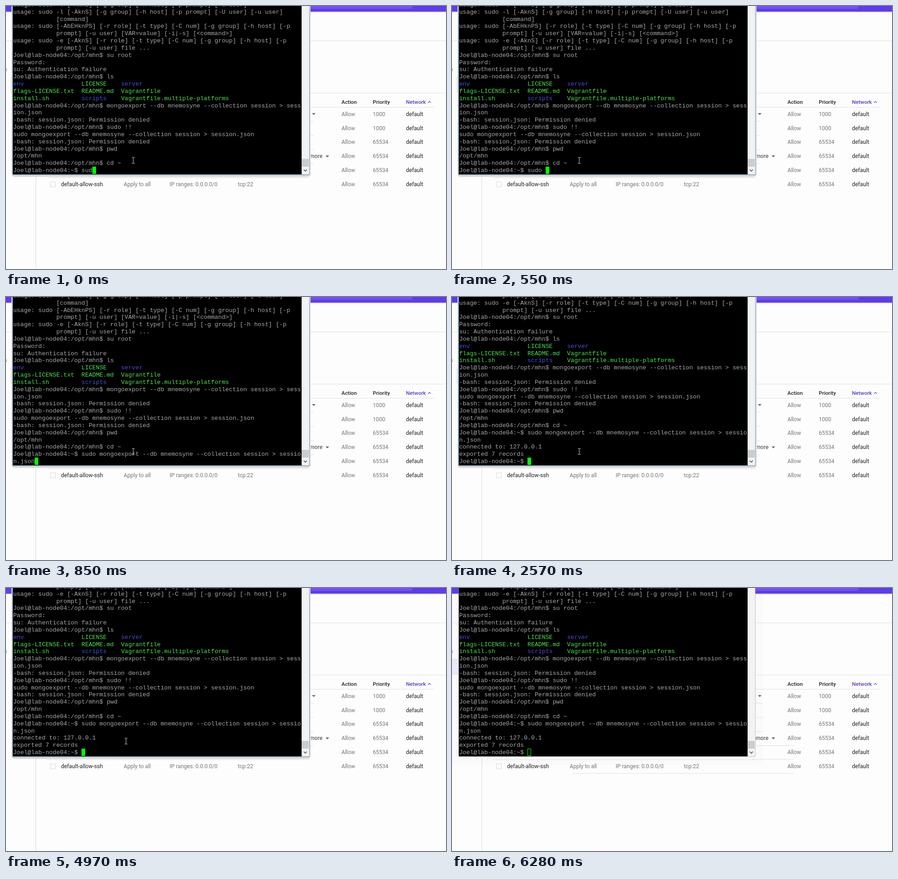
An HTML page for the animation above (6.38 s loop, 968 by 578 pixels).

```html
<!DOCTYPE html>
<html lang="en">
<head>
<meta charset="utf-8">
<title>Terminal export</title>
<style>
  html, body { margin: 0; width: 100%; height: 100%; overflow: hidden; background: #fdfdfd; }
  svg { display: block; width: 968px; height: 578px; }
  text { white-space: pre; }
  .page text { font: 12.15px Roboto, sans-serif; fill: #757575; }
  .page .dark { fill: #212121; }
  .page .head { font-size: 11.6px; font-weight: 500; fill: #212121; }
  .page .sorted { fill: #5a34d6; }
  .page .more { font-weight: 500; fill: #616161; }
  .rule { stroke: #e0e0e0; fill: none; }
  #terminal text { font: 13.2px "Liberation Mono", monospace; fill: #a8a8a8; }
  #terminal .dir { fill: #4c4ce0; }
  #terminal .exe { fill: #4ce64c; }
</style>
</head>
<body>
<svg viewBox="0 0 968 578">
  <g class="page">
    <rect width="968" height="578" fill="#fdfdfd"/>
    <rect id="tint" width="684" height="388" fill="#fafafa"/>
    <rect width="968" height="12" fill="#5f3bee"/>
    <path d="M640 0H894V4q0 2-2 2H640z" fill="#7351f6"/>
    <path d="M0 12.5H968" stroke="#a99ae8"/>
    <path d="M0 13.5H968" stroke="#dedee4"/>
    <path class="rule" d="M0 76.5H968M640 191.5H968M640 222.5H942"/>
    <path d="M65.5 360V578" stroke="#d9d9d9"/>
    <path id="rowRules" class="rule"/>
    <path id="lateRules" class="rule" d="M660 346.5H752M660 376.5H752M265 407.5H752"/>
    <rect id="selected" y="155" width="15" height="36" fill="#e9e9f8"/>
    <text x="-4" y="143">s</text>
    <path d="M673 235.5h8l-4 4zM703 328.5h8l-4 4z" fill="#616161"/>
    <text class="more" x="668" y="334">more</text>
    <text class="head" x="738" y="215">Action</text>
    <text class="head" x="807" y="215">Priority</text>
    <text class="head sorted" x="880" y="215">Network</text>
    <path d="M928.5 212.5l3-3 3 3" fill="none" stroke="#5a34d6" stroke-width="1.2"/>
    <g id="rules"></g>
    <rect x="97.5" y="386.5" width="11" height="11" fill="none" stroke="#d8d8d8"/>
    <text class="dark" x="121" y="396">default-allow-ssh</text>
    <text x="259" y="396">Apply to all</text>
    <text x="360" y="396">IP ranges: 0.0.0.0/0</text>
    <text x="510" y="396">tcp:22</text>
  </g>

  <g id="shadow">
    <rect x="12.5" y="-20" width="657" height="395" rx="6" fill="#e0e0e0" stroke="#cfcfcf"/>
    <rect x="14" y="-20" width="654" height="393" rx="3" fill="#cacaca"/>
  </g>
  <rect id="frame" x="14.5" y="-5" width="653" height="375.5"/>
  <rect x="15" width="635.5" height="370"/>
  <rect x="650.5" width="16.5" height="370" fill="#f2f2f2"/>
  <rect x="651" y="336" width="15" height="17" fill="#cdcdcd"/>
  <path d="M655 359.5l3.5 3.5 3.5-3.5" fill="none" stroke="#505050" stroke-width="1.6"/>

  <g id="terminal"></g>
  <rect id="caret"/>
  <path id="ibeam" d="M-3 -6.5h2.5l.5.5.5-.5h2.5M0-6V6M-3 6.5h2.5L0 6l.5.5h2.5" fill="none" stroke="#ddd"/>
  <path id="arrow" d="M.5.5V13l2.8-2.6 2 4.1 1.7-.8-1.9-4H9.5z" fill="#fff" stroke="#222" stroke-width=".9"/>
</svg>
<script>
const LOOP = 6380, ROWS = 24, ROW_H = 15.83, COL_W = 7.922, LEFT = 15.7, LAST_TOP = 353;
const PATCH_AT = 5270, BLUR_AT = 6280;
const $ = id => document.getElementById(id);
const dir = s => `<tspan class="dir">${s}</tspan>`;
const exe = s => `<tspan class="exe">${s}</tspan>`;

const host = "Joel@lab-node04:";
const opt = host + "/opt/mhn$ ";
const home = host + "~$ ";
const indent = " ".repeat(12);
const dump = "mongoexport --db mnemosyne --collection session > ";
const denied = "-bash: session.json: Permission denied";

const history = [
  "usage: sudo -v [-AknS] [-g group] [-h host] [-p prompt] [-u user]",
  "usage: sudo -l [-AknS] [-g group] [-h host] [-p prompt] [-U user] [-u user]",
  indent + "[command]",
  "usage: sudo [-AbEHknPS] [-r role] [-t type] [-C num] [-g group] [-h host] [-p",
  indent + "prompt] [-u user] [VAR=value] [-i|-s] [&lt;command&gt;]",
  "usage: sudo -e [-AknS] [-r role] [-t type] [-C num] [-g group] [-h host] [-p",
  indent + "prompt] [-u user] file ...",
  opt + "su root",
  "Password:",
  "su: Authentication failure",
  opt + "ls",
  dir("env") + " ".repeat(16) + exe("LICENSE") + "    " + dir("server"),
  exe("flags-LICENSE.txt  README.md  Vagrantfile"),
  exe("install.sh") + " ".repeat(9) + dir("scripts") + "    " + exe("Vagrantfile.multiple-platforms"),
  opt + dump + "sess",
  "ion.json",
  denied,
  opt + "sudo !!",
  "sudo " + dump + "session.json",
  denied,
  opt + "pwd",
  "/opt/mhn",
  opt + "cd ~"
];

const command = [home + "sudo " + dump + "sessio", "n.json"];
const screens = [
  [0, [home + "sud"]],
  [150, [home + "sudo"]],
  [550, [home + "sudo "]],
  [850, command],
  [1570, [...command, ""]],
  [2570, [...command, "connected to: 127.0.0.1", "exported 7 records", home]]
];

// Start time, shape, x, y
const pointers = [
  [0, "ibeam", 280, 339.5],
  [4970, "ibeam", 264, 336.5],
  [5120, "ibeam", 268, 336.5],
  [5270, "arrow", 743, 497],
  [5420, "arrow", 896, 491],
  [5580, "arrow", 940, 497],
  [5730, "arrow", 944, 524],
  [5880, "arrow", 948, 563],
  [5980, "none", 0, 0]
];

const at = (steps, t) => steps.findLast(step => step[0] <= t);
const show = (id, on) => $(id).setAttribute("visibility", on ? "visible" : "hidden");
const set = (id, attrs) => {
  for (const name in attrs) $(id).setAttribute(name, attrs[name]);
};

$("rules").innerHTML = [1000, 1000, 65534, 65534, 65534, 65534].map((priority, i) => {
  const y = Math.round(241.7 + i * 30.85);
  return `<text x="738" y="${y}">Allow</text><text x="807" y="${y}">${priority}</text>` +
    `<text class="dark" x="880" y="${y}">default</text>`;
}).join("");

let shownScreen;
function drawTerminal(screen) {
  if (screen === shownScreen) return;
  shownScreen = screen;
  const lines = [...history, ...screen[1]].slice(-ROWS);
  $("terminal").innerHTML = lines.map((line, i) => {
    const y = Math.round(LAST_TOP + 12 - (ROWS - 1 - i) * ROW_H);
    return `<text x="${LEFT}" y="${y}">${line}</text>`;
  }).join("");
}

function draw(t) {
  const screen = at(screens, t);
  drawTerminal(screen);

  const focused = t < BLUR_AT;
  const caretX = Math.round(LEFT + screen[1].at(-1).length * COL_W);
  set("caret", focused
    ? { x: caretX, y: LAST_TOP, width: 8, height: 16, fill: "#0f0", stroke: "none" }
    : { x: caretX + .5, y: LAST_TOP + .5, width: 7, height: 15, fill: "none", stroke: "#0f0" });
  set("frame", { fill: focused ? "#1e7fc8" : "#8a8a8a" });
  set("selected", { x: focused ? 10 : 0, width: focused ? 5 : 15 });
  const end = focused ? 677 : 684;
  set("rowRules", { d: `M660 253.5H${end}M660 284.5H${end}M660 315.5H${end}M660 346.5H${end}M90 377.5H668` });
  show("shadow", focused);
  show("tint", !focused);
  show("lateRules", t >= PATCH_AT);

  const [, shape, x, y] = at(pointers, t);
  for (const id of ["ibeam", "arrow"]) {
    show(id, id === shape);
    set(id, { transform: `translate(${x} ${y})` });
  }
}

const start = performance.now();
function tick() {
  draw((performance.now() - start) % LOOP);
  requestAnimationFrame(tick);
}
tick();
</script>
</body>
</html>
```
